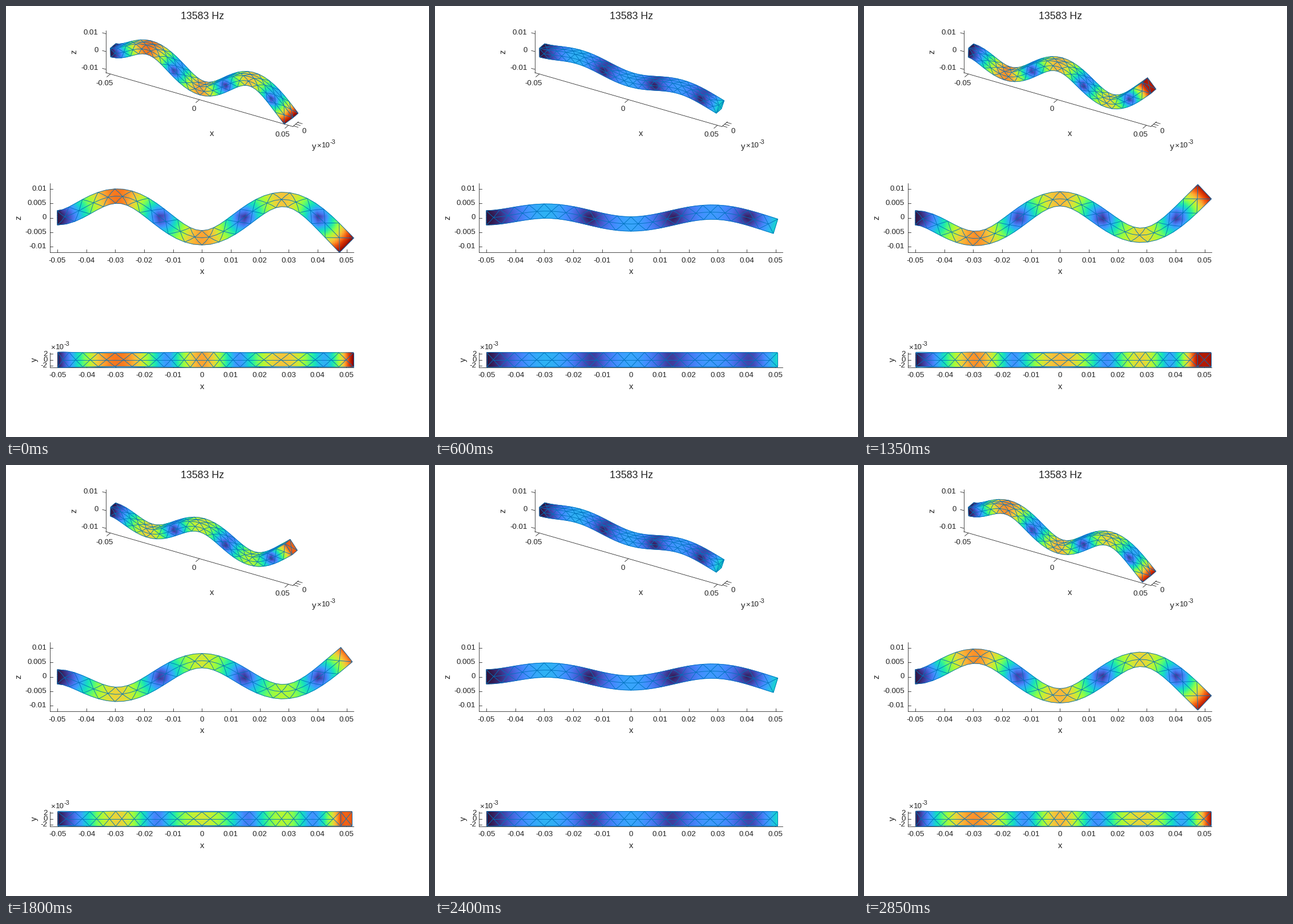
A matplotlib script for the animation above (3000 ms loop, 741x756 px).

```python
import numpy as np
import matplotlib.pyplot as plt
from matplotlib.animation import FuncAnimation
from matplotlib.collections import LineCollection

W, H, DPI = 741, 756, 64
PX = 72 / DPI
FRAMES, INTERVAL = 20, 150
INK = (0.13, 0.13, 0.13)
EDGE = (0, 0.447, 0.741)

LENGTH, HALF, POISSON, CELLS = 0.1, 0.0025, 0.3, 20

# Fourth bending mode of a cantilever, sampled finely along its length
BETA = 10.99554
S = np.linspace(0, 1, 2001)
SIGMA = (np.cosh(BETA) + np.cos(BETA)) / (np.sinh(BETA) + np.sin(BETA))
B = BETA * S
SHAPE = np.cosh(B) - np.cos(B) - SIGMA * (np.sinh(B) - np.sin(B))
DEFLECT = (0.00503 - 0.00028 * S) * SHAPE
SLOPE = np.gradient(DEFLECT, S * LENGTH)
CURVE = np.gradient(SLOPE, S * LENGTH)
TILT = 0.95 * SLOPE
PEAK = np.hypot(DEFLECT[-1], HALF * TILT[-1])

fig = plt.figure(figsize=(W / DPI, H / DPI), dpi=DPI, facecolor="white")
ax = fig.add_axes([0, 0, 1, 1])
ax.set_xlim(-0.5, W - 0.5)
ax.set_ylim(H - 0.5, -0.5)
ax.axis("off")


def deform(s, y, z, amp):
    """Displaced positions and relative displacement size."""
    w = amp * np.interp(s, S, DEFLECT)
    u = -amp * z * np.interp(s, S, TILT)
    k = amp * np.interp(s, S, CURVE)
    pos = (LENGTH * (s - 0.5) + u, y * (1 + POISSON * z * k), z + w)
    return pos, np.hypot(u, w) / PEAK


def view_iso(x, y, z):
    a, b, c = x + 0.0525, y + 0.0027, z + 0.0119
    return (174.4 + 3120 * a + 1801 * b,
            116.5 + 900 * a - 1560 * b - 3120 * c)


def view_side(x, y, z):
    return 342.8 + 5067 * x, 371 - 5067 * z


def view_top(x, y, z):
    return 342.8 + 5055 * x, 620 - 5055 * y


def long_face():
    """Two rails with a row of centre points between them."""
    n = CELLS + 1
    rail = np.arange(n) / CELLS
    mid = (np.arange(CELLS) + 0.5) / CELLS
    s = np.r_[rail, rail, mid]
    t = np.r_[np.ones(n), -np.ones(n), np.zeros(CELLS)]
    tris = [(0, n, 2 * n), (n - 1, 2 * n - 1, 2 * n + CELLS - 1)]
    edges = [(0, n), (n - 1, 2 * n - 1)]
    for i in range(CELLS):
        c = 2 * n + i
        for a in (i, n + i):
            tris.append((a, a + 1, c))
            edges += [(a, a + 1), (a, c), (a + 1, c)]
            if i < CELLS - 1:
                tris.append((c, c + 1, a + 1))
        if i < CELLS - 1:
            edges.append((c, c + 1))
    return s, HALF * t, np.array(tris), np.array(edges)


def subdivision(n):
    """Barycentric weights and small triangles of an n-fold split."""
    grid = [(i, j) for i in range(n + 1) for j in range(n + 1 - i)]
    at = {p: k for k, p in enumerate(grid)}
    small = []
    for i, j in grid:
        if i + j < n:
            small.append((at[i, j], at[i + 1, j], at[i, j + 1]))
        if i + j < n - 1:
            small.append((at[i + 1, j], at[i + 1, j + 1], at[i, j + 1]))
    return np.array([(i, j, n - i - j) for i, j in grid]) / n, np.array(small)


def split(values, tri, part):
    return np.einsum("kc,tc->tk", part[0], values[tri]).ravel()


def split_tris(tri, part):
    offsets = len(part[0]) * np.arange(len(tri))[:, None, None]
    return (part[1] + offsets).reshape(-1, 3)


# Elements have mid-side nodes; the finer split lets colours follow the map
NODES, SHADES = subdivision(2), subdivision(3)

face_s, face_t, tris, edges = long_face()
FRONT = ((face_s, 0 * face_t - HALF, face_t), tris, edges)
TOP = ((face_s, face_t, 0 * face_t + HALF), tris, edges)
ring = [(i, (i + 1) % 4) for i in range(4)]
END = ((np.ones(5), HALF * np.array([-1, 1, 1, -1, 0]),
        HALF * np.array([-1, -1, 1, 1, 0])),
       np.array([(a, b, 4) for a, b in ring]),
       np.array(ring + [(i, 4) for i in range(4)]))

moving = []


def add_lines(segments, z):
    lines = LineCollection(segments, colors=[EDGE], linewidths=0.9 * PX, zorder=z)
    moving.append(ax.add_collection(lines, autolim=False))


def draw_face(face, view, amp, z):
    rest, tri, edge = face
    pos, size = deform(*(split(v, tri, NODES) for v in rest), amp)
    px, py = view(*pos)
    element = split_tris(tri, NODES)
    moving.append(ax.tripcolor(
        *(split(v, element, SHADES) for v in (px, py, size)),
        triangles=split_tris(element, SHADES),
        shading="gouraud", cmap="turbo", vmin=0, vmax=1, zorder=z))

    ends = [v[edge] for v in rest]
    curved = [np.c_[v[:, 0], v.mean(axis=1), v[:, 1]] for v in ends]
    pos, _ = deform(*curved, amp)
    add_lines(np.stack(view(*pos), axis=-1), z + 0.5)


def draw_lower_rails(amp):
    s = np.linspace(0, 1, 2 * CELLS + 1)
    for y in (-HALF, HALF):
        pos, _ = deform(s, y + 0 * s, 0 * s - HALF, amp)
        add_lines([np.c_[view_top(*pos)]], 3)


def line(x0, y0, x1, y1):
    ax.plot([x0, x1], [y0, y1], color=INK, lw=0.8 * PX, zorder=1)


def text(x, y, label, size=13.3, ha="center", rot=0):
    ax.text(x, y, label, fontsize=size * PX, family="Liberation Sans", color=INK,
            ha=ha, va="center", rotation=rot, zorder=1)


def exponent(x, y):
    text(x + 4.5, y, "×")
    text(x + 9.5, y, "10", ha="left")
    text(x + 24.5, y - 6, "-3", 11, ha="left")


def x_ruler(view, base, label_y, name_y):
    line(76, base, 608, base)
    for k in range(-5, 6):
        px = view(k / 100, 0, 0)[0]
        line(px, base, px, base - 5)
        text(px, label_y, f"{k / 100:g}")
    text(343, name_y, "x", 14.6)


def draw_iso_axes():
    lo = (-0.0525, -0.0027, -0.0119)
    corner = view_iso(*lo)
    right = view_iso(0.0525, lo[1], lo[2])
    line(*corner, *view_iso(lo[0], lo[1], 0.0119))
    line(*corner, *right)
    line(*right, *view_iso(0.0525, 0.0027, lo[2]))
    for z in (-0.01, 0, 0.01):
        px, py = view_iso(lo[0], lo[1], z)
        line(px, py, px - 6, py - 1.7)
        text(161, py - 2, f"{z:g}", ha="right")
    for x in (-0.05, 0, 0.05):
        px, py = view_iso(x, lo[1], lo[2])
        line(px, py, px - 6, py + 5.2)
        text(px - 10, py + 17, f"{x:g}")
    for y in (-0.002, 0, 0.002):
        px, py = view_iso(0.0525, y, lo[2])
        line(px, py, px + 8, py + 2.3)
    text(522, 219.5, "0")
    text(119, 80, "z", 14.6, rot=90)
    text(360, 224, "x", 14.6)
    text(539.5, 246, "y", 14.6)
    exponent(542.5, 245)


def draw_side_axes():
    line(76, 310, 76, 431)
    x_ruler(view_side, 431, 446, 465.5)
    for k in range(-2, 3):
        py = view_side(0, 0, k / 200)[1]
        line(76, py, 81, py)
        text(70.5, py, f"{k / 200:g}", ha="right")
    text(22, 371, "z", 14.6, rot=90)


def draw_top_axes():
    line(76, 607, 76, 633)
    x_ruler(view_top, 633, 647.5, 667)
    for k in (-2, 0, 2):
        py = view_top(0, k / 1000, 0)[1]
        line(76, py, 81, py)
        text(72, py + 0.5, f"{k}", ha="right")
    text(49, 620, "y", 14.6, rot=90)
    exponent(77, 599)


text(343, 18, "13583 Hz", 17.8)
draw_iso_axes()
draw_side_axes()
draw_top_axes()


def update(frame):
    while moving:
        moving.pop().remove()
    amp = np.cos(2 * np.pi * frame / FRAMES)
    tilt = amp * TILT[-1]

    draw_face(TOP, view_iso, amp, 3)
    if tilt > -0.866:
        draw_face(END, view_iso, amp, 4)
    draw_face(FRONT, view_iso, amp, 5)

    draw_face(FRONT, view_side, amp, 3)

    draw_lower_rails(amp)
    draw_face(TOP, view_top, amp, 4)
    if tilt > 0:
        draw_face(END, view_top, amp, 5)
    return moving


anim = FuncAnimation(fig, update, frames=FRAMES, interval=INTERVAL,
                     repeat=True, repeat_delay=0, blit=False)
plt.show()
```
